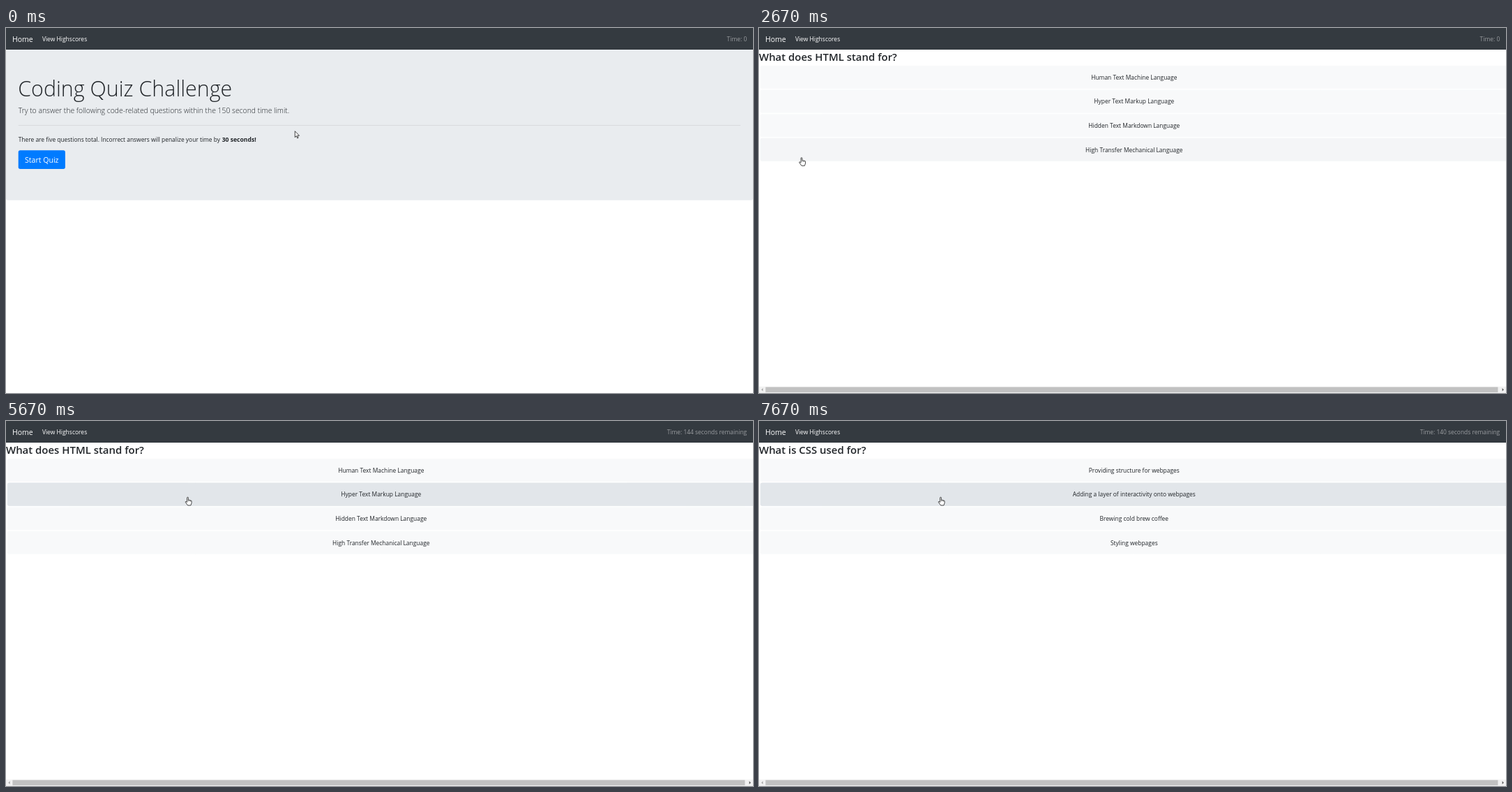
Recreate the animation shown at these times as an HTML page with a canvas. Size 1071 by 523 pixels, loop 8 s.

```html
<!DOCTYPE html>
<html lang="en">
<head>
<meta charset="utf-8">
<title>Coding Quiz Challenge</title>
<style>
html, body { margin: 0; width: 100%; height: 100%; overflow: hidden; background: #fff; }
canvas { display: block; }
</style>
</head>
<body>
<canvas id="stage" width="1071" height="523"></canvas>
<script>
const W = 1071, H = 523, LOOP = 8000, FPS = 15;
const SCALE = 0.5536;
const BODY = 8.44;
const START = 2670, NEXT = 6670, ALERT_END = 7660;
const ctx = document.getElementById('stage').getContext('2d');

const QUIZ = [
  ['What does HTML stand for?',
    ['Human Text Machine Language', 'Hyper Text Markup Language',
     'Hidden Text Markdown Language', 'High Transfer Mechanical Language']],
  ['What is CSS used for?',
    ['Providing structure for webpages', 'Adding a layer of interactivity onto webpages',
     'Brewing cold brew coffee', 'Styling webpages']]
];

// Pointer moves: start, end, from, to, and how late y follows x.
const MOVES = [
  [560, 1440, [414, 147.5], [104, 171], 2],
  [1420, 2020, [104, 171], [61, 185.5], 1],
  [3480, 3890, [61, 185.5], [207, 188.5], 1],
  [3880, 4700, [207, 188.5], [260.5, 109], 1]
];

// Row hover spans: row, from, to.
const HOVERS = [
  [3, 2670, 3650], [3, 3930, 4130], [2, 4130, 4450], [1, 4450, NEXT - 1], [1, NEXT, 9999]
];

const ARROW = new Path2D('M.5 .5V16.5L4.2 13L6.8 18.8L9.2 17.8L6.7 12.2H11.8Z');
const HAND = new Path2D('M5 13V2a1.6 1.6 0 0 1 3.2 0V8q1.6-1.2 3 .4q1.6-.9 2.8 .6' +
  'q2.6-.4 2.6 1.8V15.5L14.5 21.5H6.8L1 13.6q-.9-2.2 1.2-2.2L5 14');

const clamp = v => Math.max(0, Math.min(1, v));
const smooth = v => { v = clamp(v); return v * v * (3 - 2 * v); };
const fade = (t, from) => clamp((t - from + 30) / 150);
const mix = (a, b, f) =>
  'rgb(' + a.map((v, i) => Math.round(v + (b[i] - v) * f)).join() + ')';

function box(x, y, w, h, r, fill, stroke) {
  ctx.beginPath();
  ctx.roundRect(x, y, w, h, r);
  ctx.fillStyle = fill;
  ctx.fill();
  if (stroke) {
    ctx.strokeStyle = stroke;
    ctx.lineWidth = SCALE;
    ctx.stroke();
  }
}

function text(str, x, y, size, color, weight = 400, align = 'left') {
  ctx.font = `${weight} ${size}px "Open Sans", "Noto Sans", sans-serif`;
  ctx.textAlign = align;
  ctx.fillStyle = color;
  ctx.fillText(str, x, y);
}

function pointer(t) {
  let [x, y] = MOVES[0][2];
  for (const [from, to, a, b, lag] of MOVES) {
    if (t < from) break;
    const f = smooth((t - from) / (to - from));
    x = a[0] + (b[0] - a[0]) * f;
    y = a[1] + (b[1] - a[1]) * f ** lag;
  }
  return [x, y];
}

function drawNav(t) {
  box(0, 0, W, 31, 0, '#343a40');
  text('Home', 8.9, 20, 10.5, '#fff');
  text('View Highscores', 51.9, 19, 8.5, '#fff');
  const ticks = Math.floor((t - START) / 1000 + 0.01);
  const label = ticks < 1 ? 'Time: 0' : `Time: ${150 - 2 * ticks} seconds remaining`;
  text(label, 1062.2, 19, BODY, '#999c9f', 400, 'right');
}

function drawIntro(t, over, overAt) {
  box(0, 31, W, 215.7, 2.7, '#e9ecef');
  text('Coding Quiz Challenge', 17.2, 98, 30.4, '#212529', 300);
  text('Try to answer the following code-related questions within the 150 second time limit.',
    17.7, 122, 10.4, '#212529', 300);
  box(17.7, 138.9, 1035.4, 0.8, 0, 'rgba(0,0,0,.1)');
  text('There are five questions total. Incorrect answers will penalize your time by',
    17.7, 163, 8.42, '#212529');
  text('30 seconds!', 309.7, 163, 8.6, '#212529', 700);

  const press = fade(t, 2530);
  if (press) {
    const ring = 1.77 * press;
    box(17.7 - ring, 175.3 - ring, 67.2 + 2 * ring, 26.6 + 2 * ring, 2.7 + ring,
      `rgba(38,143,255,${0.5 * press})`);
  }
  const hover = over ? fade(t, overAt) : 0;
  box(17.7, 175.3, 67.2, 26.6, 2.7, mix([0, 123, 255], [0, 98, 204], hover * (0.8 + 0.2 * press)));
  text('Start Quiz', 51.3, 193, 10.55, '#fff', 400, 'center');
}

function drawScrollbar() {
  box(0, 513.7, W, 9.3, 0, '#f1f1f1');
  box(9.4, 514.4, 1050, 7.6, 0, '#c1c1c1');
  for (const [x, dir, color] of [[3.4, 1, '#a3a3a3'], [1067.8, -1, '#505050']]) {
    ctx.fillStyle = color;
    ctx.beginPath();
    ctx.moveTo(x, 518.3);
    ctx.lineTo(x + 2.2 * dir, 516.1);
    ctx.lineTo(x + 2.2 * dir, 520.5);
    ctx.fill();
  }
}

function drawQuiz(t) {
  const second = t >= NEXT;
  const [question, answers] = QUIZ[second ? 1 : 0];
  text(question, 0, 47, 14.95, '#212529', 600);

  answers.forEach((answer, i) => {
    const y = 54.2 + 34.6 * i;
    let hover = 0;
    for (const [row, from, to] of HOVERS) {
      if (row === i && !(second && to < NEXT)) hover += fade(t, from) - fade(t, to);
    }
    const press = i === 1 && !second ? fade(t, 6530) : 0;
    if (press) {
      const ring = 1.77 * press;
      box(2.2 - ring, y - ring, W + 2 * ring, 32.6 + 2 * ring, 2.2 + ring,
        `rgba(216,217,219,${0.5 * press})`);
    }
    const level = clamp(hover) + 0.35 * press;
    box(2.2, y, W, 32.6, 2.2,
      mix([248, 249, 250], [226, 230, 234], level),
      mix([248, 249, 250], [218, 224, 229], level));
    text(answer, 537.8, Math.round(y + 19.6), BODY, '#212529', 400, 'center');
  });

  if (second && t < ALERT_END) {
    box(0.3, 199.3, W - 0.6, 27.6, 2.2, '#d4edda', '#c3e6cb');
    text('Correct!', 11.6, 216.5, BODY, '#155724');
  }
  drawScrollbar();
}

function drawPointer(x, y, hand) {
  ctx.save();
  ctx.translate(hand ? x - 6.6 * SCALE : x, y);
  ctx.scale(SCALE, SCALE);
  ctx.lineWidth = 1.3;
  ctx.lineJoin = 'round';
  ctx.fillStyle = '#fff';
  ctx.strokeStyle = '#000';
  const shape = hand ? HAND : ARROW;
  ctx.fill(shape);
  ctx.stroke(shape);
  if (hand) {
    ctx.lineWidth = 0.8;
    ctx.beginPath();
    for (const kx of [8.2, 11.2, 14]) {
      ctx.moveTo(kx, 8.6);
      ctx.lineTo(kx, 11.5);
    }
    ctx.stroke();
  }
  ctx.restore();
}

function draw(ms) {
  const t = Math.floor(ms * FPS / 1000 + 0.06) * 1000 / FPS + 4;
  const [x, y] = pointer(t);
  const over = x < 85 && y > 175.3;
  box(0, 0, W, H, 0, '#fff');
  drawNav(t);
  if (t < START) drawIntro(t, over, 1690);
  else drawQuiz(t);
  drawPointer(x, y, over || t >= START);
}

function loop(now) {
  draw(now % LOOP);
  requestAnimationFrame(loop);
}
draw(0);
requestAnimationFrame(loop);
</script>
</body>
</html>
```
